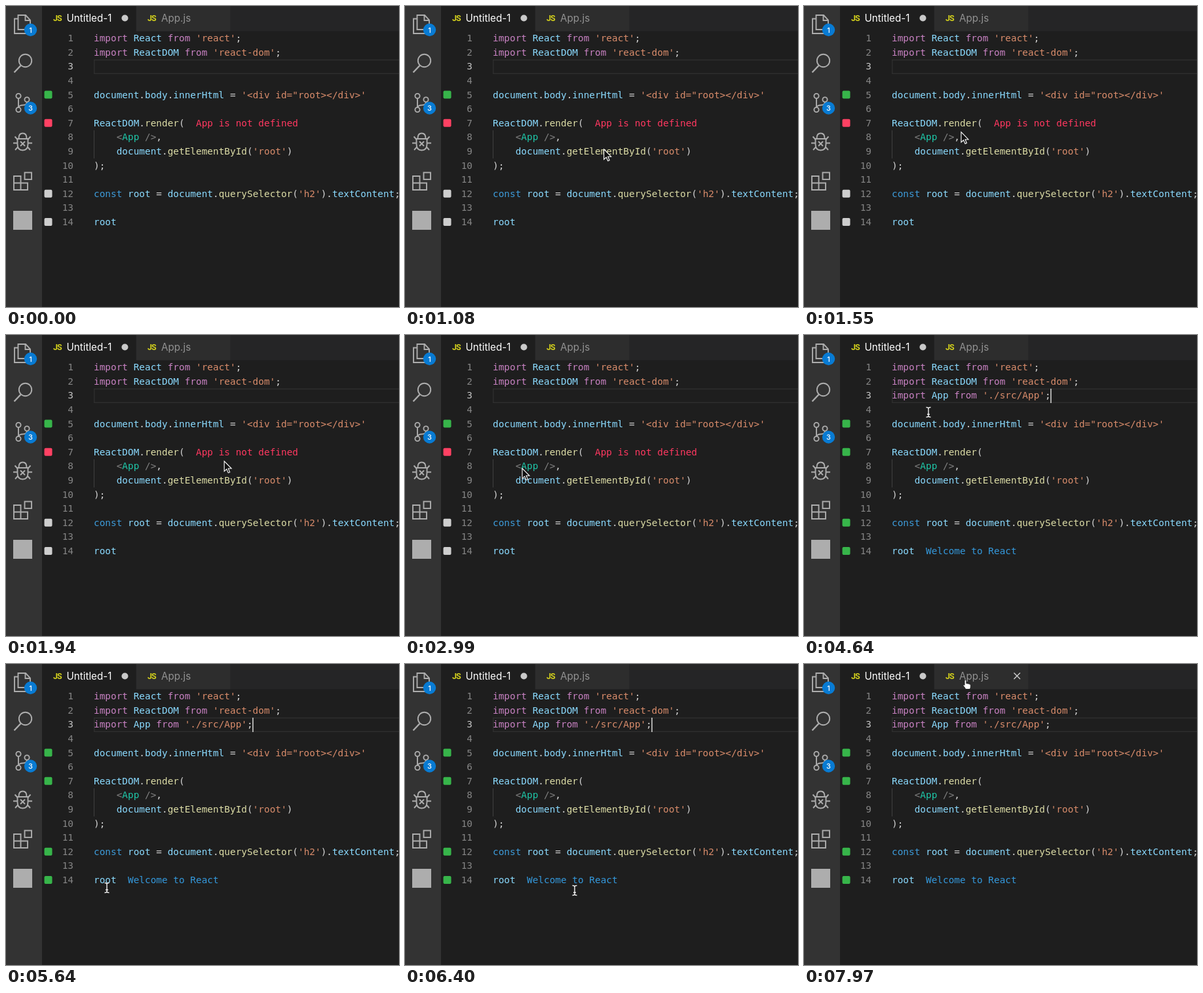
Write an HTML page that moves like this. It is 600x460 px and loops after 8 s.

```html
<!DOCTYPE html>
<html lang="en">
<head>
<meta charset="utf-8">
<title>Editor demo</title>
<style>
  html, body { margin: 0; width: 100%; height: 100%; overflow: hidden; background: #1e1e1e; }
  svg { display: block; }
  text { white-space: pre; }
  .code text { font: 14.4px "DejaVu Sans Mono", monospace; fill: #d4d4d4; }
  .code .num { fill: #858585; text-anchor: end; }
  .code .num.active { fill: #c6c6c6; }
  .str { fill: #d98c6b; }
  .key { fill: #c982c3; }
  .decl { fill: #3d9bd9; }
  .angle { fill: #808080; }
  .tag { fill: #1fc6a8; }
  .fn { fill: #dcdca6; }
  .id { fill: #8adaff; }
  .code .error { fill: #ff3860; }
  .code .value { fill: #3498db; }
  .tab { font: 15.2px Inter, sans-serif; }
  .js { font: 700 12.5px Roboto, sans-serif; letter-spacing: -.9px; fill: #d3d01c; }
  .icons { fill: none; stroke: #adadad; stroke-width: 1.9; }
  .badge { font: 500 11px Inter, sans-serif; fill: #fff; text-anchor: middle; }
</style>
</head>
<body>
<svg width="600" height="460" viewBox="0 0 600 460">
  <rect width="600" height="460" fill="#1e1e1e"/>
  <rect x="55" width="545" height="38.5" fill="#252526"/>
  <rect x="55" width="143.5" height="39" fill="#1e1e1e"/>
  <rect x="199" width="143.5" height="38.5" fill="#2d2d2d"/>
  <rect width="55" height="460" fill="#333"/>

  <g class="icons">
    <path d="M18.5 14h11.5l7 7.5v14.5H18.5zM29.5 14v8H37M18.5 19.5H13V42H31v-6"/>
    <path d="M22.5 91L12.5 101.5" stroke-width="2.4"/>
    <circle cx="29.5" cy="83.5" r="9.7"/>
    <circle cx="19" cy="137.5" r="3.6"/>
    <circle cx="19" cy="158.5" r="3.6"/>
    <circle cx="32" cy="143" r="3.6"/>
    <path d="M19 141v14M32 146.5q0 5-6 5t-7 4"/>
    <path d="M17.5 203h16v8q0 9.500-8 9.500t-8-9.500zM19.5 202q0-7.500 6-7.500t6 7.500M22 207l7 7m0-7l-7 7"/>
    <path id="legs" d="M17.500 204l-4-4.500M17 209.500h-6M18.500 215l-4.500 5"/>
    <use href="#legs" transform="translate(51) scale(-1 1)"/>
    <path d="M12 260h10.500v21H12zM12 270.500h21v10.500H22.500"/>
    <rect x="28.500" y="254.500" width="10.500" height="10.500"/>
  </g>
  <rect x="11" y="313" width="29" height="29" fill="#adadad"/>
  <circle cx="37.5" cy="36.5" r="9.7" fill="#087bd3"/>
  <text class="badge" x="37.5" y="40.5">1</text>
  <circle cx="37.5" cy="156" r="9.7" fill="#087bd3"/>
  <text class="badge" x="37.5" y="160">3</text>

  <text class="js" x="72" y="23.3">JS</text>
  <text class="tab" x="92.5" y="24" fill="#fff">Untitled-1</text>
  <circle cx="181.5" cy="18.5" r="5" fill="#c9c9c9"/>
  <text class="js" x="216" y="23.3">JS</text>
  <text class="tab" x="237" y="24" fill="#929292">App.js</text>
  <path id="close" d="M320.5 13.5l9.5 9.5m0-9.5l-9.5 9.5" stroke="#d0d0d0" stroke-width="1.4"/>

  <path d="M600 82.5H134.7V103.3H600" fill="none" stroke="#2e2e2e" stroke-width="1.4"/>
  <path d="M134.5 190v43" stroke="#404040"/>
  <g class="code" id="code"></g>
  <rect id="caret" y="82" width="1.7" height="22" fill="#c4c4c2"/>

  <path id="arrow" d="M0 0V15.6L3.6 12.3L6.1 17.9L8.5 16.9L6.1 11.3H11z" fill="#111" stroke="#fff" stroke-width="1.1"/>
  <path id="beam" d="M-3.5-7.5Q0-7.5 0-5.5Q0-7.5 3.5-7.5M0-6V6M-3.5 7.5Q0 7.5 0 5.5Q0 7.5 3.5 7.5M-2 3.3H2" fill="none" stroke="#f2f2f2" stroke-width="1.4"/>
  <path id="hand" d="M-1.4 8V1.2a1.4 1.4 0 0 1 2.8 0V5.4q1.2-.9 2.3.3 1.3-.7 2.2.5 2-.3 2 1.6V10q0 2-1.2 4h-6.4q-1-2.4-3.8-5.4-.6-1.6 1.2-1.4z" fill="#fff" stroke="#111" stroke-width=".8"/>
</svg>
<script>
const LOOP = 8000, CLICK = 3600, PASTE = 4250, RUN = 4640, HOVER = 7740;
const LEFT = 134, CHAR = 8.669, PITCH = 21.6;
const GREEN = '#37b54a', RED = '#ff4163', GRAY = '#cecece';

const lines = [
  "import React from 'react';",
  "import ReactDOM from 'react-dom';",
  "import App from './src/App';",
  "",
  "document.body.innerHtml = '<div id=\"root></div>'",
  "",
  "ReactDOM.render(",
  "    <App />,",
  "    document.getElementById('root')",
  ");",
  "",
  "const root = document.querySelector('h2').textContent;",
  "",
  "root"
];
const kinds = ['str', 'key', 'decl', 'angle', 'tag', 'fn', 'id'];
const syntax = /('[^']*')|(\b(?:import|from)\b)|(\bconst\b)|(<|\/>)|((?<=<)\w+)|(\w+(?=\())|(\w+)|[^\w'<]/g;

const byId = id => document.getElementById(id);
const code = byId('code');
const lineY = n => 54.1 + (n - 1) * PITCH;
const show = (node, on) => node.setAttribute('visibility', on ? 'visible' : 'hidden');

function add(parent, name, attrs, content = '') {
  const node = document.createElementNS('http://www.w3.org/2000/svg', name);
  for (const key in attrs) node.setAttribute(key, attrs[key]);
  node.textContent = content;
  return parent.appendChild(node);
}

const rows = lines.map((line, i) => {
  const y = lineY(i + 1);
  add(code, 'text', { class: i === 2 ? 'num active' : 'num', x: 103, y }, i + 1);
  const row = add(code, 'text', { x: LEFT, y });
  for (const m of line.matchAll(syntax)) {
    const kind = kinds[m.slice(1).findIndex(Boolean)];
    add(row, 'tspan', kind ? { class: kind } : {}, m[0]);
  }
  return row;
});

const note = (cls, n, col, content) =>
  add(code, 'text', { class: cls, x: LEFT + col * CHAR, y: lineY(n) }, content);
const error = note('error', 7, 18, 'App is not defined');
const value = note('value', 14, 6, 'Welcome to React');

const marks = [[5, GREEN], [7, RED], [12, GRAY], [14, GRAY]].map(([n, before]) => ({
  before,
  node: add(code, 'rect', { x: 58.5, y: lineY(n) - 11, width: 12, height: 12, rx: 2 })
}));

// Each move bends from the previous end point via a control point; steps make it jerky.
const glide = (start, end, via, to, steps) => ({ start, end, via, to, steps });
const jump = (start, to) => glide(start, start, to, to);
const entry = [419, 452];
const moves = [
  glide(870, 1080, [350, 320], [304, 219]),
  glide(1080, 1660, [213, 190], [249, 192.5]),
  glide(1690, 2050, [331, 192.5], [351, 193]),
  glide(2200, 2540, [270, 186], [179, 204]),
  glide(2990, CLICK, [175, 130], [159, 96]),
  jump(PASTE, [165.5, 99]),
  jump(4430, [186.5, 109]),
  jump(RUN, [190, 118]),
  glide(5020, 5640, [206, 290], [154, 342], 7),
  jump(5790, [197, 342]),
  jump(5930, [138, 335]),
  glide(6080, 6400, [200, 350], [259, 346], 4),
  glide(6900, 7680, [482, 385], [292, 45]),
  glide(HOVER, 7970, [258, 26], [246.5, 24.5])
];

function pointerAt(t) {
  const i = moves.findLastIndex(m => m.start <= t);
  const { start, end, via, to, steps } = moves[i];
  if (t >= end) return to;
  const from = i ? moves[i - 1].to : entry;
  let k = (t - start) / (end - start);
  if (steps) k = (Math.floor(k * (steps - 1)) + 1) / steps;
  const j = 1 - k;
  return from.map((p, a) => p * j * j + 2 * via[a] * j * k + to[a] * k * k);
}

const caret = byId('caret'), close = byId('close');
const pointers = { arrow: byId('arrow'), beam: byId('beam'), hand: byId('hand') };

function draw(t) {
  const pasted = t >= PASTE, ran = t >= RUN;
  show(rows[2], pasted);
  show(error, !ran);
  show(value, ran);
  for (const { node, before } of marks) node.setAttribute('fill', ran ? GREEN : before);

  const blinkOn = Math.floor((t - PASTE + 10) / 500) % 2 === 0;
  show(caret, pasted ? blinkOn : t >= CLICK + 30);
  caret.setAttribute('x', pasted ? LEFT + 28 * CHAR - .6 : LEFT);
  show(close, t >= HOVER);

  const active = t < moves[0].start ? '' : t < CLICK ? 'arrow' : t < HOVER ? 'beam' : 'hand';
  for (const name in pointers) show(pointers[name], name === active);
  if (active) pointers[active].setAttribute('transform', `translate(${pointerAt(t)})`);
}

function tick() {
  draw(performance.now() % LOOP);
  requestAnimationFrame(tick);
}
tick();
</script>
</body>
</html>
```
